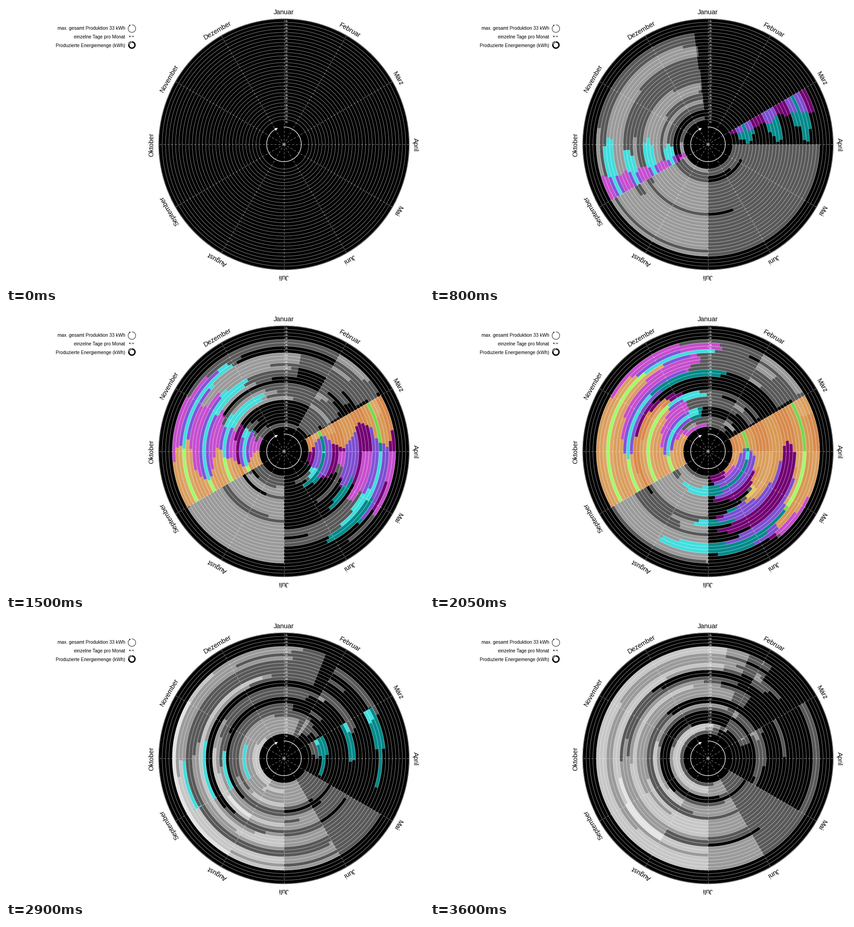
A matplotlib script that plays this animation: 917 px wide and 611 px high, repeating every 3.65 s.

```python
import numpy as np
import matplotlib.pyplot as plt
from matplotlib.animation import FuncAnimation
from matplotlib.collections import LineCollection
from matplotlib.patches import Arc, Circle, Polygon

W, H, DPI = 917, 611, 100
CX, CY = 609.8, 302.9
R0, STEP, RINGS = 54.2, 7.34, 26
FRAMES, KNOT = 73, 12
PX = 72 / DPI

MONTHS = ["Januar", "Februar", "März", "April", "Mai", "Juni", "Juli",
          "August", "September", "Oktober", "November", "Dezember"]

# White veils: start angle, first frame, last frame, full sweep, density
VEILS = [
    (90, 0, 28, 263, 1.2), (180, 0, 26, 174, 0.8),
    (180, 16, 52, 238, 1.3), (180, 21, 48, 190, 0.7),
    (30, 18, 80, 40, 0.1), (90, 22, 46, 90, 0.3),
    (120, 46, 80, 262, 0.9), (150, 46, 80, 245, 0.8),
    (180, 46, 80, 190, 0.4), (210, 46, 80, 110, -0.2),
    (60, 46, 80, 60, -0.2),
]
# Wedges that carry the inks: start angle, ring period of the cyan bands
WEDGES = [(60, 8.5), (240, 6)]
PEAK = 44

GRAYS = np.array([0, 88, 154, 198, 228, 250])
# Index: ink bits (cyan 1, magenta 2, yellow 4), then black or grey ground
INKS = np.array([
    [(0, 0, 0), (0, 0, 0)],
    [(0, 138, 138), (64, 222, 222)],
    [(114, 0, 114), (198, 78, 206)],
    [(124, 78, 208), (130, 84, 216)],
    [(128, 112, 0), (222, 202, 96)],
    [(120, 215, 80), (160, 252, 104)],
    [(216, 138, 76), (218, 158, 94)],
    [(216, 152, 84), (222, 166, 104)],
])

K = np.arange(RINGS)
THETA = np.arange(0, 360, 0.5)


def make_noise(rng):
    """Random value per time knot and ring, softened across rings."""
    raw = rng.normal(size=(FRAMES // KNOT + 2, RINGS + 2))
    soft = raw[:, :-2] + 2 * raw[:, 1:-1] + raw[:, 2:]
    return soft / soft.std()


rng = np.random.default_rng(7)
VEIL_NOISE = [make_noise(rng) for _ in VEILS]
INK_NOISE = [[make_noise(rng) for _ in range(3)] for _ in WEDGES]


def noise_at(noise, frame):
    i, rest = divmod(frame, KNOT)
    return noise[i] + (noise[i + 1] - noise[i]) * rest / KNOT


def wave(period):
    return np.cos(2 * np.pi * (K - 4) / period)


def veil_sweep(veil, noise, frame):
    _, first, last, full, density = veil
    grow = np.clip(min(frame - first, last - frame) / 8, 0, 1)
    return full * grow * np.clip(noise_at(noise, frame) + density, 0, 1)


def hump(frame, first, last):
    """Straight rise to the peak frame, straight fall afterwards."""
    return np.clip(np.minimum((frame - first) / (PEAK - first),
                              (last - frame) / (last - PEAK)), 0, 1)


def ink_sweeps(period, noises, frame):
    """Sweeps of cyan, magenta and yellow for every ring of a wedge."""
    band = wave(period)
    vary = [1 + 0.2 * noise_at(n, frame) for n in noises]
    cyan = 140 * hump(frame, 9, 52 + 12 * band) * (0.75 + 0.25 * band)
    magenta = 110 * hump(frame, 13, 56)
    yellow = 62 * hump(frame, 23, 54) * (1 - 0.6 * wave(12))
    return [cyan * vary[0] * (band > -0.1),
            magenta * vary[1] * (band < 0.96),
            yellow * vary[2]]


def covered(start, sweep):
    return (THETA - start) % 360 < sweep[:, None]


def polar_colors(frame):
    level = np.zeros((RINGS, THETA.size), int)
    inks = np.zeros_like(level)
    for veil, noise in zip(VEILS, VEIL_NOISE):
        level += covered(veil[0], veil_sweep(veil, noise, frame))
    for (start, period), noises in zip(WEDGES, INK_NOISE):
        for bit, sweep in enumerate(ink_sweeps(period, noises, frame)):
            inks |= covered(start, sweep) * (1 << bit)
    gray = GRAYS[np.minimum(level, 5)][..., None]
    return np.where(inks[..., None] > 0, INKS[inks, np.minimum(level, 1)], gray)


# Pixel to polar lookup over a square around the centre, sampled 2 x 2
HALF = 248
X0, Y0 = int(CX) - HALF, int(CY) - HALF
axis = np.arange(0, 2 * HALF, 0.5) + 0.25
dx, dy = np.meshgrid(axis + X0 - CX, axis + Y0 - CY)
ring = np.floor((np.hypot(dx, dy) - R0) / STEP).astype(int)
ring[(ring < 0) | (ring >= RINGS)] = RINGS
angle = (np.degrees(np.arctan2(dx, -dy)) % 360 * 2).astype(int) % THETA.size
LOOKUP = ring * THETA.size + angle


def disc_image(frame):
    table = np.zeros((RINGS + 1, THETA.size, 3), np.uint16)
    table[:RINGS] = polar_colors(frame)
    fine = table.reshape(-1, 3)[LOOKUP]
    total = fine[::2, ::2] + fine[1::2, ::2] + fine[::2, 1::2] + fine[1::2, 1::2]
    return (total // 4).astype(np.uint8)


def polar(r, deg):
    a = np.radians(deg)
    return CX + r * np.sin(a), CY - r * np.cos(a)


plt.rcParams["font.family"] = "Liberation Sans"
fig = plt.figure(figsize=(W / DPI, H / DPI), dpi=DPI, facecolor="white")
ax = fig.add_axes([0, 0, 1, 1])


def label(x, y, text, px, **kw):
    kw = {"ha": "center", "va": "center", "color": "black", **kw}
    ax.text(x, y, text, fontsize=px * PX, zorder=6, **kw)


plate = ax.add_patch(Circle((CX, CY), 275.3, fc="black", ec="none", zorder=1))
disc = ax.imshow(disc_image(0), extent=(X0, X0 + 2 * HALF, Y0 + 2 * HALF, Y0),
                 interpolation="nearest", zorder=2)
disc.set_clip_path(plate)
ax.set_xlim(0, W)
ax.set_ylim(H, 0)
ax.set_aspect("auto")
ax.axis("off")

turn = np.linspace(0, 360, 241)
rings = [np.column_stack(polar(R0 + STEP * k, turn)) for k in range(31)]
ax.add_collection(LineCollection(rings, colors="white", linewidths=0.75 * PX,
                                 alpha=0.7, zorder=3))
for m, month in enumerate(MONTHS):
    deg = 30 * m
    x, y = polar(274, deg)
    ax.plot([CX, x], [CY, y], color="white", lw=0.8 * PX, alpha=0.65,
            dashes=(6, 4.5), zorder=4)
    x, y = polar(289.5, deg)
    label(x - 1, y + 1, month, 14.6, rotation=-deg, rotation_mode="anchor")
for day in range(1, 32):
    label(611.8, 253.5 - STEP * (day - 1), f"{day:02d}", 6.4, ha="left",
          va="center_baseline", color="white")

# Direction arrow in the hub
ax.plot(*polar(38, np.linspace(0, 335, 200)), color="white", lw=1.3 * PX, zorder=5)
ax.add_patch(Polygon([(596.5, 267.3), (588.5, 267.5), (592, 273)],
                     fc="white", ec="none", zorder=5))


def icon_arc(y, size, theta1, theta2, width):
    ax.add_patch(Arc((276.2, y), size, size, theta1=theta1, theta2=theta2,
                     lw=width * PX, color="black"))


# Legend
for y, text in [(48.5, "max. gesamt Produktion 33 kWh"),
                (67, "einzelne Tage pro Monat"),
                (85.5, "Produzierte Energiemenge (kWh)")]:
    label(261.5, y, text, 10.3, ha="right", va="center_baseline")
icon_arc(49.5, 16.5, -90, 245, 0.9)
ax.add_patch(Polygon([(273.5, 41.3), (270, 41.5), (271.8, 44)], fc="black"))
label(275.5, 67, "01–31", 4.4, weight="bold")
icon_arc(85.5, 13.5, -90, 190, 3)
icon_arc(85.5, 16, 190, 262, 1.2)
icon_arc(85.5, 11.5, 180, 270, 1.2)


def update(frame):
    disc.set_data(disc_image(frame))
    return [disc]


anim = FuncAnimation(fig, update, frames=FRAMES, interval=50, repeat=True,
                     repeat_delay=0, blit=False)
plt.show()
```
